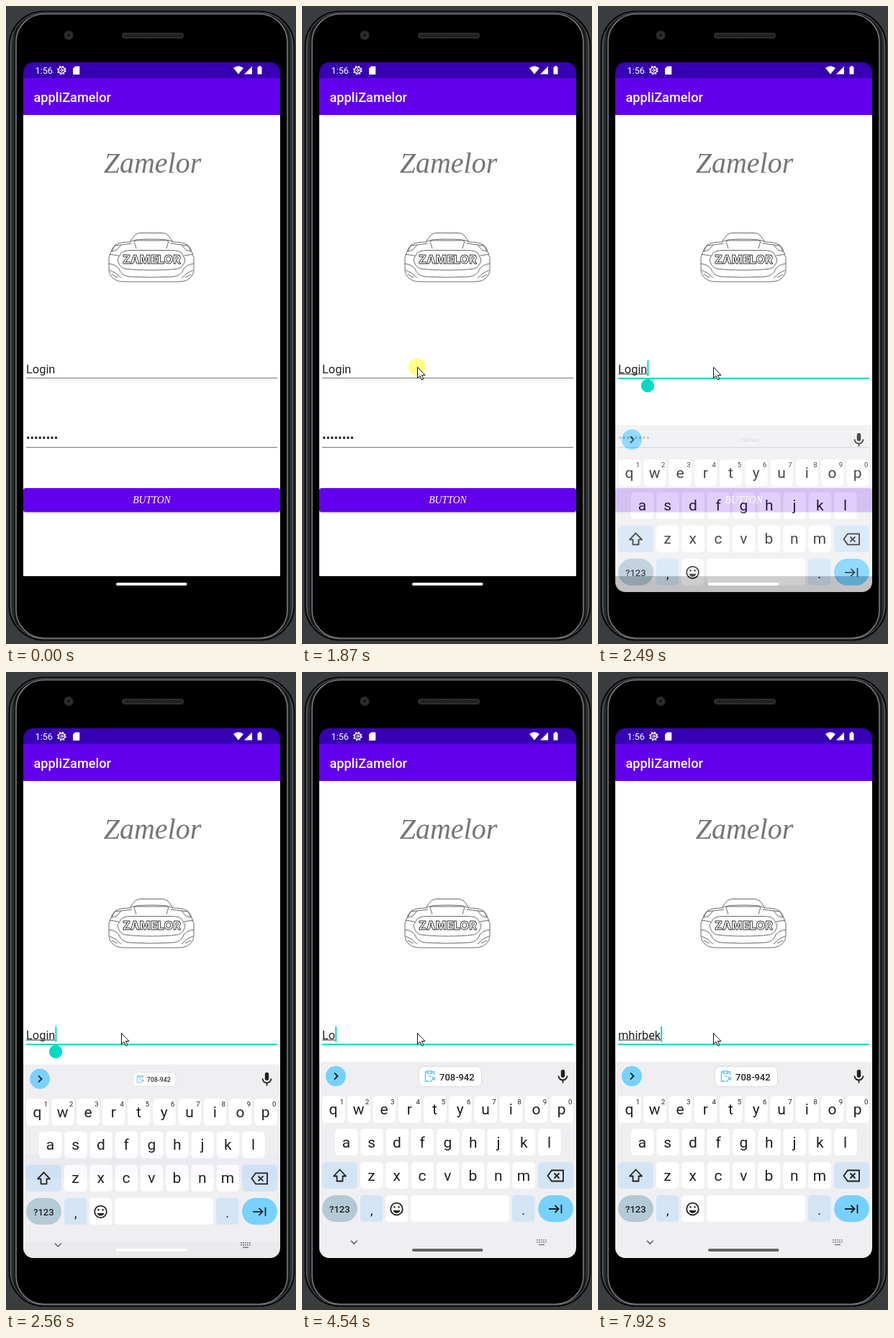
These frames come from a looping animation (403x884 px, 8000 ms). An HTML page:

```html
<!DOCTYPE html>
<html lang="en">
<head>
<meta charset="utf-8">
<title>Login screen</title>
<style>
  html, body { margin: 0; width: 100%; height: 100%; overflow: hidden; background: #3a3c3e; }
  svg { display: block; width: 403px; height: 884px; font-family: Roboto, sans-serif; }
  .script { font-family: "Liberation Serif", serif; font-style: italic; }
  .mid { text-anchor: middle; }
  .line { fill: none; stroke: #1f1f1f; stroke-width: 1.8; }
</style>
</head>
<body>
<svg viewBox="0 0 403 884">
  <defs>
    <clipPath id="screen"><rect x="24" y="78" width="357" height="734" rx="14"/></clipPath>
    <linearGradient id="metal">
      <stop offset="0" stop-color="#4a4d50"/><stop offset=".02" stop-color="#17181a"/>
      <stop offset=".98" stop-color="#17181a"/><stop offset="1" stop-color="#4a4d50"/>
    </linearGradient>
    <g id="halfCar">
      <path d="M202 314.5H187Q180 315 177 320L172 327Q158 327 152 331Q147 335 145 343Q142 348 143 356V366Q144 374 150 378Q154 382 166 382H202"/>
      <path d="M202 325H186Q180 324 178 326L181 336M172 327Q176 323 202 323M160 331L175 329"/>
      <path d="M202 338.5H177Q161 338 159 344L155 351Q157 362 165 364Q180 366 202 366"/>
      <path d="M147 340L151 332L160 331L154 338ZM144 344L157 346M143 357Q152 358 157 364Q160 374 172 375L202 376M144 366L152 370L160 377M147 372L155 376"/>
    </g>
  </defs>

  <!-- phone -->
  <rect x="4.5" y="7.5" width="396" height="871" rx="48" fill="url(#metal)" stroke="#08090a" stroke-width="2"/>
  <rect x="6.5" y="9" width="392" height="868" rx="46" fill="none" stroke="#5c5f62"/>
  <rect x="14" y="11" width="377" height="865" rx="39" fill="#000" stroke="#777a7d" stroke-width="1.6"/>
  <circle cx="87" cy="40.500" r="6.500" fill="#292a2b"/>
  <circle cx="87" cy="40.500" r="3" fill="#11151a" stroke="#3a3d40"/>
  <rect x="161" y="37" width="86" height="8" rx="4" fill="#2c2d2e"/>
  <path d="M165 41H244" stroke="#161616" stroke-width="4" stroke-dasharray="1.500 1.500"/>

  <!-- app -->
  <g clip-path="url(#screen)">
    <path fill="#3700b3" d="M24 78H381V100H24Z"/>
    <path fill="#6200ee" d="M24 100H381V151H24Z"/>
    <path fill="#fff" d="M24 151H381V790H24Z"/>
  </g>
  <g fill="#fff">
    <text x="40.500" y="94" font-size="12.7">1:56</text>
    <circle cx="77.300" cy="89" r="4.300" fill="none" stroke="#fff" stroke-width="1.500"/>
    <circle cx="77.300" cy="89" r="5.700" fill="none" stroke="#fff" stroke-width="1.400" stroke-dasharray="2.240 2.240"/>
    <path d="M76 86.500L80 89H74.500M76 91.500L80 89" fill="none" stroke="#fff"/>
    <path d="M96 83.500H101.500Q102.300 83.500 102.300 84.500V94Q102.300 95 101.500 95H94Q93 95 93 94V86.500Z"/>
    <path d="M316 86Q323 80.500 330 86L323 94.500ZM331 94.500L342 83.500V94.500ZM350 84.500H351.200V83H354V84.500H355.500V94.500H349.500V84.500Z"/>
    <text x="38.500" y="132.500" font-size="18.2" font-weight="500">appliZamelor</text>
  </g>
  <text class="script mid" x="203.500" y="231" font-size="40" fill="#757575">Zamelor</text>
  <g fill="none" stroke="#444" stroke-width=".8">
    <use href="#halfCar"/>
    <use href="#halfCar" transform="translate(404) scale(-1 1)"/>
    <text class="mid" x="202.500" y="357" font-family="Inter, sans-serif" font-weight="800" font-size="16.300" fill="#fff" stroke="#222">ZAMELOR</text>
  </g>

  <rect id="rule" x="28" width="349"/>
  <text id="login" x="28" y="508.500" font-size="16.400" fill="#212121"></text>
  <rect id="under" x="28" y="509.500" height="1" fill="#333"/>
  <rect id="caret" y="491" width="2" height="22" fill="#03dac5"/>
  <path id="handle" d="M69 515.500L75.500 519.500A9.200 9.200 0 1 1 62.500 519.500Z" fill="#03dac5"/>
  <text x="28" y="604" font-size="16.400" fill="#212121">••••••••</text>
  <path d="M28 611.500H377" stroke="#757575"/>
  <rect x="24" y="668" width="357" height="33" rx="3.600" fill="#6200ee" style="filter:drop-shadow(0 1px 1px #0006)"/>
  <text class="script mid" x="202.500" y="689" font-size="13.800" fill="#fff">BUTTON</text>

  <!-- keyboard -->
  <g clip-path="url(#screen)">
    <g id="board">
      <path fill="#efeff2" d="M24 540H381V812H24Z"/>
      <circle cx="47" cy="560" r="14" fill="#76d1ff"/>
      <path class="line" d="M45 555.500L49.500 560L45 564.500"/>
      <g id="chip">
        <rect x="162.500" y="546.500" width="87" height="28" rx="7" fill="#fff" stroke="#d9dbdf"/>
        <path d="M174 554H171.500V567H177M181 554H183.500V558M174.500 553H180.500V556H174.500ZM175.500 560H179M178 568L184 562M180 562H184V566" fill="none" stroke="#65c3ee" stroke-width="1.500"/>
        <text x="191" y="565.700" font-size="13" font-weight="500" fill="#222">708-942</text>
      </g>
      <rect x="359.800" y="551" width="5.400" height="11" rx="2.700" fill="#1f1f1f"/>
      <path class="line" d="M356.500 559.500A6 6 0 0 0 368.500 559.500M362.500 565.500V569.500"/>
      <g id="keys"></g>
      <path class="line" d="M52.500 689.500L61 698.500H56.500V705.500H48.500V698.500H44Z" stroke-linejoin="round"/>
      <path class="line" d="M347 690.500H363V705.500H347L341.500 698ZM350.500 694.500L357.500 701.500M357.500 694.500L350.500 701.500"/>
      <circle class="line" cx="131.500" cy="744" r="8.300"/>
      <path d="M126.500 746H136.500A5.200 5.200 0 0 1 126.500 746Z" fill="#1f1f1f"/>
      <path d="M128.500 740.200V742.600M134.500 740.200V742.600" stroke="#1f1f1f" stroke-width="2.200"/>
      <path class="line" d="M343 744H356M351.500 739L356.500 744L351.500 749M360.500 738V750" stroke-width="2"/>
      <path d="M68 788L72.300 792.300L76.600 788" fill="none" stroke="#555" stroke-width="1.400"/>
      <path d="M326 787H340M326 790H340" stroke="#777" stroke-width="1.700" stroke-dasharray="1.700 1.300"/>
      <path d="M329 793.500H337" stroke="#777" stroke-width="1.500"/>
    </g>
  </g>
  <rect id="pill" x="153" y="799" width="98.500" height="4" rx="2"/>

  <circle id="halo" cx="160" cy="500" r="12" fill="#ffff80"/>
  <path id="mouse" d="M.5 .5V15.500L4 12.300L6.500 18L8.800 17L6.400 11.500H11Z" fill="#fff" stroke="#111"/>
</svg>
<script>
const $ = id => document.getElementById(id);
const show = (id, on) => $(id).style.display = on ? "" : "none";
const clamp = v => Math.min(1, Math.max(0, v));
const span = (t, a, b) => clamp((t - a) / (b - a));
const mix = (a, b, k) => a + (b - a) * k;
const smooth = k => k * k * (3 - 2 * k);

// Standard material curve, cubic-bezier(.4, 0, .2, 1)
function material(x) {
  let lo = 0, hi = 1;
  for (let i = 0; i < 20; i++) {
    const s = (lo + hi) / 2, r = 1 - s;
    if (1.2 * s * r * r + .6 * s * s * r + s ** 3 < x) lo = s; else hi = s;
  }
  return smooth(lo);
}

function buildKeys() {
  const pitch = 35.25;
  let out = "";
  const box = (x, y, w, fill, r = 5) =>
    out += `<rect x="${x}" y="${y}" width="${w}" height="37" rx="${r}" fill="${fill}"/>`;
  const label = (x, y, size, s, extra = "") =>
    out += `<text class="mid" x="${x}" y="${y}" font-size="${size}" fill="#1f1f1f" ${extra}>${s}</text>`;
  [["qwertyuiop", 28, 587.5], ["asdfghjkl", 46, 633], ["zxcvbnm", 81, 679]].forEach(([row, left, y], r) =>
    [...row].forEach((c, i) => {
      const x = left + pitch * i;
      box(x, y, 31.5, "#fff");
      label(x + 15.5, y + 25.5, 21, c);
      if (!r) label(x + 27.5, y + 11, 9.5, (i + 1) % 10);
    }));
  box(28, 679, 49, "#d3e5f5");
  box(328, 679, 49, "#d3e5f5");
  box(28, 725, 49, "#b3c9d6", 18.5);
  box(81, 725, 31.5, "#d3e5f5");
  box(116, 725, 31.5, "#fff");
  box(151, 725, 137, "#fff");
  box(292, 725, 31.5, "#d3e5f5");
  box(328, 725, 49, "#76d1ff", 18.5);
  label(52.3, 749, 13, "?123", 'font-weight="500"');
  label(96.7, 752, 18, ",");
  label(307.7, 752, 18, ".");
  $("keys").innerHTML = out;
}

// [time, text] of each change in the field
const edits = [[0, "Login"], [2700, "Login"]];
[4130, 4330, 4470, 4740, 4880].forEach((t, i) => edits.push([t, "Login".slice(0, 4 - i)]));
[6000, 6660, 6860, 7130, 7260, 7460, 7730].forEach((t, i) => edits.push([t, "mhirbek".slice(0, i + 1)]));

function drawField(t) {
  const [since, text] = edits.filter(e => e[0] <= t).pop();
  const focused = t >= 2000, field = $("login");
  if (field.textContent !== text) field.textContent = text;
  const width = n => n ? field.getSubStringLength(0, n) : 0;
  const lined = t >= 7730 && t < 7920 ? text.length - 1 : text.length;
  show("under", t >= 2270 && lined);
  $("under").setAttribute("width", width(lined));
  show("caret", focused && (t < 2700 || Math.floor((t - since) / 455) % 2 === 0));
  $("caret").setAttribute("x", 28 + width(text.length));
  show("handle", t >= 2270 && t < 2700);
  const rule = $("rule");
  rule.setAttribute("y", focused ? 515 : 515);
  rule.setAttribute("height", focused ? 2 : 1);
  rule.setAttribute("fill", focused ? "#03dac5" : "#757575");
}

function drawBoard(t) {
  const k = material(span(t, 2347, 2600));
  show("board", k > 0);
  $("board").setAttribute("transform", `translate(0 ${272 * (1 - k)})`);
  $("board").setAttribute("opacity", k ** 1.3);
  const c = span(t, 2480, 2700), s = mix(.5, 1, c);
  $("chip").setAttribute("opacity", clamp(c * 2.5));
  $("chip").setAttribute("transform", `translate(206 560.5) scale(${s}) translate(-206 -560.5)`);
  const g = Math.round(mix(255, 100, span(t, 2830, 4540)));
  $("pill").setAttribute("fill", `rgb(${g},${g},${g})`);
}

function drawMouse(t) {
  const k = smooth(span(t, 180, 940)), m = smooth(span(t, 1200, 1470));
  const curve = (a, b, c) => mix(mix(a, b, k), mix(b, c, k), k);
  const x = mix(curve(294, 180, 164), 160, m), y = mix(curve(760, 600, 488), 500, m);
  show("mouse", t >= 180);
  $("mouse").setAttribute("transform", `translate(${x} ${y})`);
  show("halo", t >= 1870 && t < 2070);
  $("halo").setAttribute("opacity", 1 - span(t, 1960, 2070));
}

buildKeys();
const start = performance.now();
function frame() {
  const t = (performance.now() - start) % 8000;
  drawField(t);
  drawBoard(t);
  drawMouse(t);
  requestAnimationFrame(frame);
}
frame();
</script>
</body>
</html>
```
